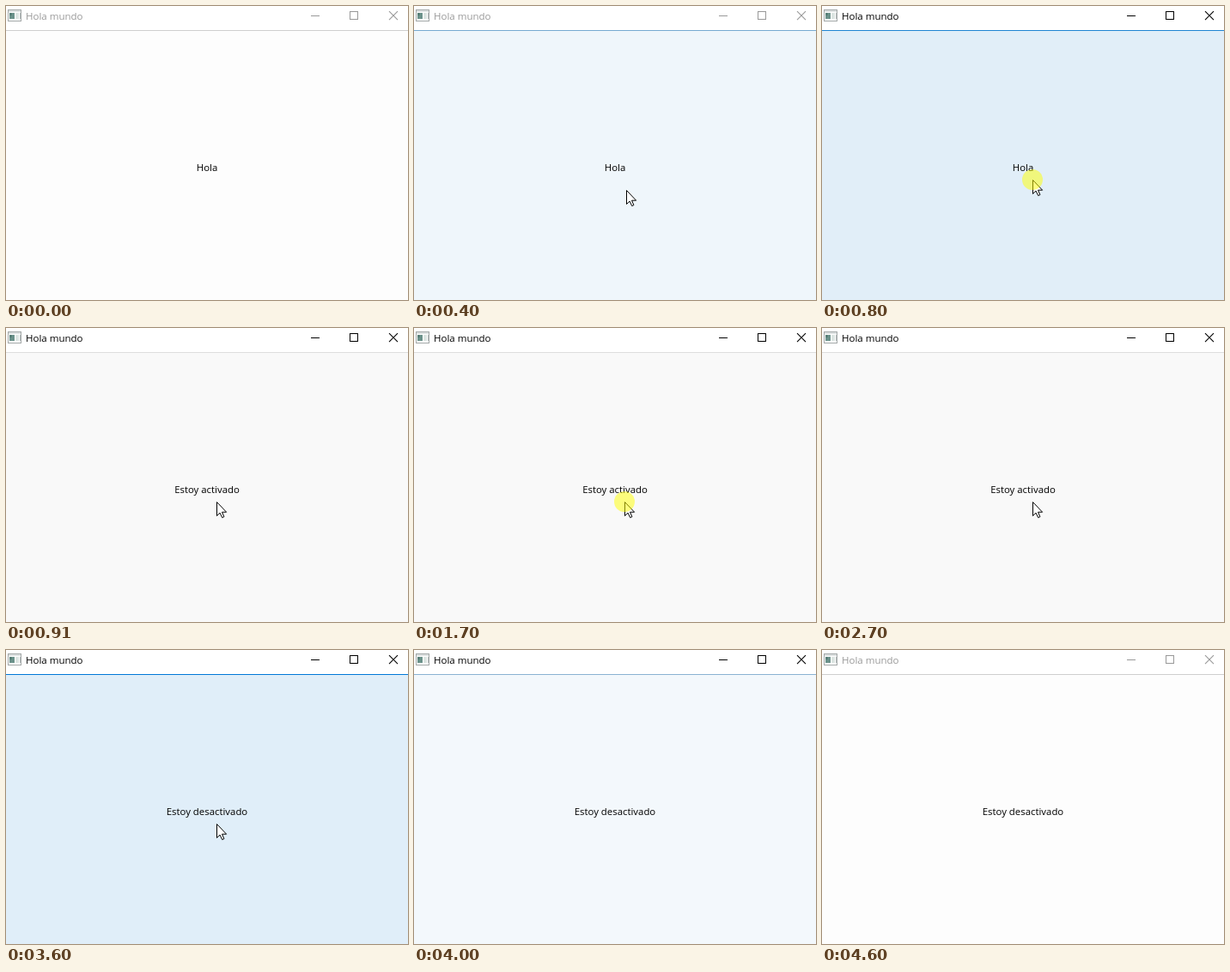
Animation of 468 by 342 pixels, one loop 4.7 s. Source, as an HTML page:

```html
<!DOCTYPE html>
<html lang="es">
<head>
<meta charset="utf-8">
<title>Hola mundo</title>
<style>
html, body { margin: 0; width: 100%; height: 100%; overflow: hidden; background: #fff; }
svg { display: block; }
text { font: 11.4px "Open Sans", "Noto Sans", sans-serif; }
</style>
</head>
<body>
<svg width="468" height="342" viewBox="0 0 468 342">
  <rect width="468" height="28" fill="#fff"/>
  <g id="icon" shape-rendering="crispEdges">
    <rect x="2" y="4" width="16" height="14" fill="#a3a8a8"/>
    <rect x="3" y="5" width="14" height="2" fill="#dde1e1"/>
    <rect x="3" y="7" width="14" height="10" fill="#fff"/>
    <rect x="4" y="8" width="6" height="7" fill="#6b928b"/>
    <rect x="4" y="8" width="3" height="3" fill="#588078"/>
    <rect x="11" y="8" width="4" height="7" fill="#dce5e2"/>
    <rect x="16" y="8" width="1" height="7" fill="#b5bcbb"/>
  </g>
  <text id="title" x="23" y="16" style="font-size:11.5px">Hola mundo</text>
  <g id="controls" fill="none">
    <path d="M355 11.5H365M400.5 6.5H409.5V15.5H400.5Z" shape-rendering="crispEdges"/>
    <path d="M446 6.2L456 16.2M456 6.2L446 16.2" stroke-width="1.1"/>
  </g>
  <rect id="button" y="28" width="468" height="314"/>
  <rect id="edge" y="28" width="468" height="1"/>
  <text id="label" x="234" y="192" text-anchor="middle"></text>
  <path id="cursor" d="M.5 .5V16.5L4.1 13.1L6.7 18.6L8.9 17.6L6.5 12.2H11.6Z"
    fill="#fff" stroke="#000" stroke-linejoin="round"/>
  <circle id="press" cx="245" cy="202" r="12" fill="#ff0" fill-opacity=".5"/>
</svg>
<script>
const LOOP = 4700;
const el = id => document.getElementById(id);

// Button looks: fill, top edge
const rest = [[253, 253, 253], [207, 207, 207]];
const hover = [[224, 238, 249], [0, 120, 215]];
const firstHover = [[225, 238, 248], [30, 132, 210]];
const checked = [[249, 249, 249], [222, 222, 222]];

// start, fade length, look
const looks = [
  [0, 0, rest], [200, 400, firstHover], [910, 0, checked], [1700, 400, hover],
  [2700, 0, checked], [3300, 300, hover], [3800, 300, rest]
];
const labels = [
  [0, "Hola"], [910, "Estoy activado"], [1800, "Estoy desactivado"],
  [2700, "Estoy activado"], [3400, "Estoy desactivado"]
];
const presses = [[800, 910], [1700, 1800], [2600, 2700], [3300, 3400]];
// time, x, y of the pointer tip
const path = [
  [200, 254, 285], [300, 250, 243], [400, 247, 214], [500, 245, 204],
  [600, 245, 202], [3600, 245, 202], [3700, 249, 242], [3800, 256, 323]
];

const mix = (a, b, u) => a.map((v, i) => v + (b[i] - v) * u);
const rgb = c => `rgb(${c.map(Math.round)})`;
const lastIndex = (list, t) => list.filter(k => k[0] <= t).length - 1;

function place(t) {
  const i = lastIndex(path, t);
  const a = path[i], b = path[i + 1] || a;
  const u = b === a ? 0 : (t - a[0]) / (b[0] - a[0]);
  return mix(a, b, u).slice(1).map(Math.round);
}

function draw(time) {
  const now = time % LOOP;
  const t = Math.floor(now / 100) * 100;

  const i = lastIndex(looks, now);
  const [start, fade, look] = looks[i];
  const from = i ? looks[i - 1][2] : look;
  const u = fade ? Math.min(1, Math.max(0, (t - start) / fade)) : 1;
  el("button").setAttribute("fill", rgb(mix(from[0], look[0], u)));
  el("edge").setAttribute("fill", rgb(mix(from[1], look[1], u)));

  el("label").textContent = labels[lastIndex(labels, now)][1];

  const active = now >= 800 && now < 4600;
  el("title").setAttribute("fill", active ? "#000" : "#999");
  el("controls").setAttribute("stroke", active ? "#000" : "#999");

  const inside = t >= 200 && t < 3900;
  el("cursor").style.display = inside ? "" : "none";
  if (inside) el("cursor").setAttribute("transform", `translate(${place(t)})`);

  const down = presses.some(([a, b]) => now >= a && now < b);
  el("press").style.display = down ? "" : "none";
}

const begin = performance.now();
function tick() {
  draw(performance.now() - begin);
  requestAnimationFrame(tick);
}
tick();
</script>
</body>
</html>
```
